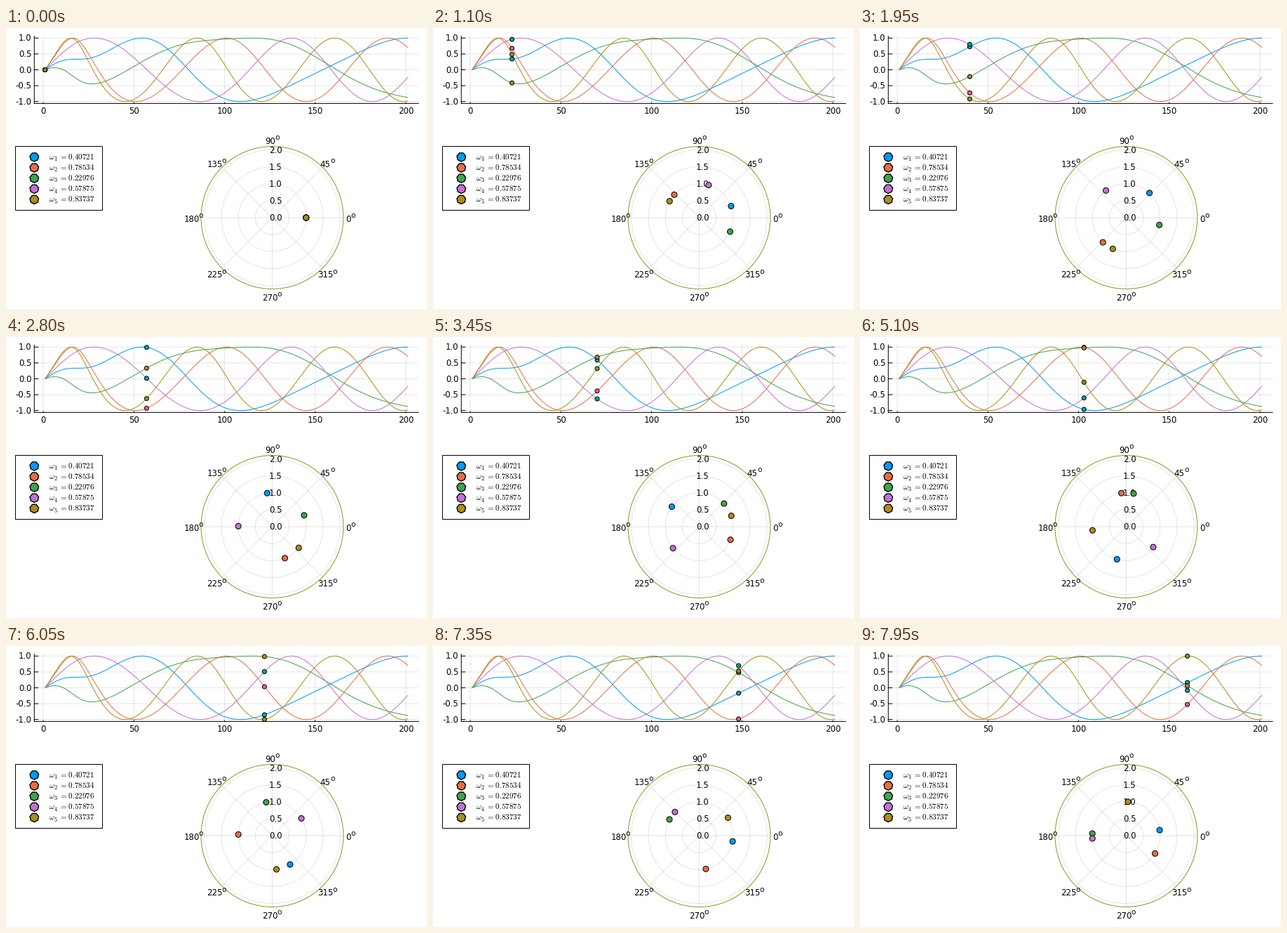
These frames come from a looping animation (600x400 px, 8000 ms). A matplotlib script:

```python
import numpy as np
import matplotlib.pyplot as plt
from matplotlib.animation import FuncAnimation
from matplotlib.patches import Circle, Rectangle, RegularPolygon

PX = 0.72  # points per pixel at 100 dpi
W, H = 600, 400
FRAMES, INTERVAL = 160, 50

OMEGA = np.array([0.40721, 0.78534, 0.22976, 0.57875, 0.83737])
COUPLING = -1.0
STEPS, DT, SUB = 201, 0.1, 5

COLORS = ["#009AFA", "#E36F47", "#3EA44E", "#C371D2", "#AC8E18"]
DOT_COLORS = ["#00AAAE", "#ED5E93", "#C68225", "#00A98D", "#8E971E"]


def rate(th):
    """Kuramoto model, all oscillators coupled to each other."""
    pull = np.sin(th[None, :] - th[:, None]).mean(axis=1)
    return OMEGA + COUPLING * pull


def solve():
    th = np.zeros(len(OMEGA))
    out = [th]
    h = DT / SUB
    for _ in range(STEPS - 1):
        for _ in range(SUB):
            k1 = rate(th)
            k2 = rate(th + h / 2 * k1)
            k3 = rate(th + h / 2 * k2)
            k4 = rate(th + h * k3)
            th = th + h / 6 * (k1 + 2 * k2 + 2 * k3 + k4)
        out.append(th)
    return np.array(out)


theta = solve()

plt.rcParams["font.family"] = "DejaVu Sans"
plt.rcParams["mathtext.fontset"] = "cm"
fig = plt.figure(figsize=(W / 100, H / 100), dpi=100, facecolor="white")
ax = fig.add_axes([0, 0, 1, 1])
ax.set_xlim(0, W)
ax.set_ylim(H, 0)
ax.axis("off")


def line(x, y, color="black", **kw):
    ax.plot(x, y, color=color, lw=PX, snap=False, **kw)


def grid(x, y):
    line(x, y, alpha=0.1, zorder=1)


def text(x, y, s, ha="left", size=8, zorder=3):
    ax.text(x, y, s, ha=ha, va="baseline", fontsize=size, zorder=zorder)


def label(x, y, s, ha="center"):
    """Text whose digits are centred on height y."""
    text(x, y + 4.1, s, ha, 8.5)


def dot(color, radius, zorder):
    return ax.add_patch(Circle((0, 0), radius, fc=color, ec="black", lw=PX,
                               zorder=zorder))


# time series
LEFT, RIGHT, TOP, BOTTOM = 40.3, 588.0, 11.6, 107.4


def sx(i):
    return 53.1 + 2.584 * i


def sy(v):
    return 59.5 - 45.2 * v


for v in (-1, -0.5, 0, 0.5, 1):
    grid([LEFT, RIGHT], [sy(v)] * 2)
    line([LEFT, LEFT + 5.5], [sy(v)] * 2, zorder=2)
    label(36.4, sy(v), f"{v:.1f}", ha="right")
for i in range(0, 201, 50):
    grid([sx(i)] * 2, [TOP, BOTTOM])
    line([sx(i)] * 2, [BOTTOM, BOTTOM - 1.2], zorder=2)
    label(sx(i), 117.4, str(i))
line([LEFT, LEFT], [TOP, BOTTOM], zorder=2)
line([LEFT, RIGHT], [BOTTOM, BOTTOM], zorder=2)

index = np.arange(1, STEPS + 1)
for k, color in enumerate(COLORS):
    line(sx(index), sy(np.sin(theta[:, k])), color, zorder=4)

# polar plot
CX, CY, UNIT = 379.4, 270.0, 48.3
RIM = 2.1 * UNIT


def ring(radius, **kw):
    ax.add_patch(Circle((CX, CY), radius, fill=False, lw=PX, **kw))


for a in np.arange(8) * np.pi / 4:
    grid([CX, CX + RIM * np.cos(a)], [CY, CY - RIM * np.sin(a)])
for r in (0.5, 1, 1.5, 2):
    ring(r * UNIT, ec="black", alpha=0.1, zorder=1)
ring(RIM, ec="#8E971E", zorder=2)
for r in (0, 0.5, 1, 1.5, 2):
    label(384.1, CY + 0.3 - r * UNIT, f"{r:.1f}")

ANGLE_POS = [(487.7, 272), (455.2, 193.5), (376.4, 160.5), (297.4, 193.5),
             (264.4, 272), (297.4, 351.2), (376.4, 384), (455.2, 351.2)]
for k, (x, y) in enumerate(ANGLE_POS):
    s = str(45 * k)
    label(x, y, s)
    text(x + 3.6 * len(s) - 0.4, y - 1.5, "o", size=7.5)

# legend
ax.add_patch(Rectangle((13.5, 168.5), 124, 91, fc="white", ec="black",
                       lw=PX, snap=False, zorder=3))
for k, (w, color) in enumerate(zip(OMEGA, COLORS)):
    y = 183.7 + 15.1 * k
    ax.add_patch(RegularPolygon((40.3, y), 7, radius=6.4, fc=color,
                                ec="black", lw=1, snap=False, zorder=4))
    base = y + 3.2
    text(61, base, r"$\omega$", zorder=4)
    text(68.4, base + 2.4, f"${k + 1}$", size=6, zorder=4)
    text(76.2, base, f"$= {w:.5f}$", zorder=4)

top_dots = [dot(c, 3, 6 + k) for k, c in enumerate(DOT_COLORS)]
polar_dots = [dot(c, 4, 6 + k) for k, c in enumerate(COLORS)]


def update(n):
    for k, th in enumerate(theta[n]):
        top_dots[k].center = sx(n + 1), sy(np.sin(th))
        polar_dots[k].center = CX + UNIT * np.cos(th), CY - UNIT * np.sin(th)
    return top_dots + polar_dots


anim = FuncAnimation(fig, update, frames=FRAMES, interval=INTERVAL,
                     repeat=True, repeat_delay=0, blit=False)
plt.show()
```
